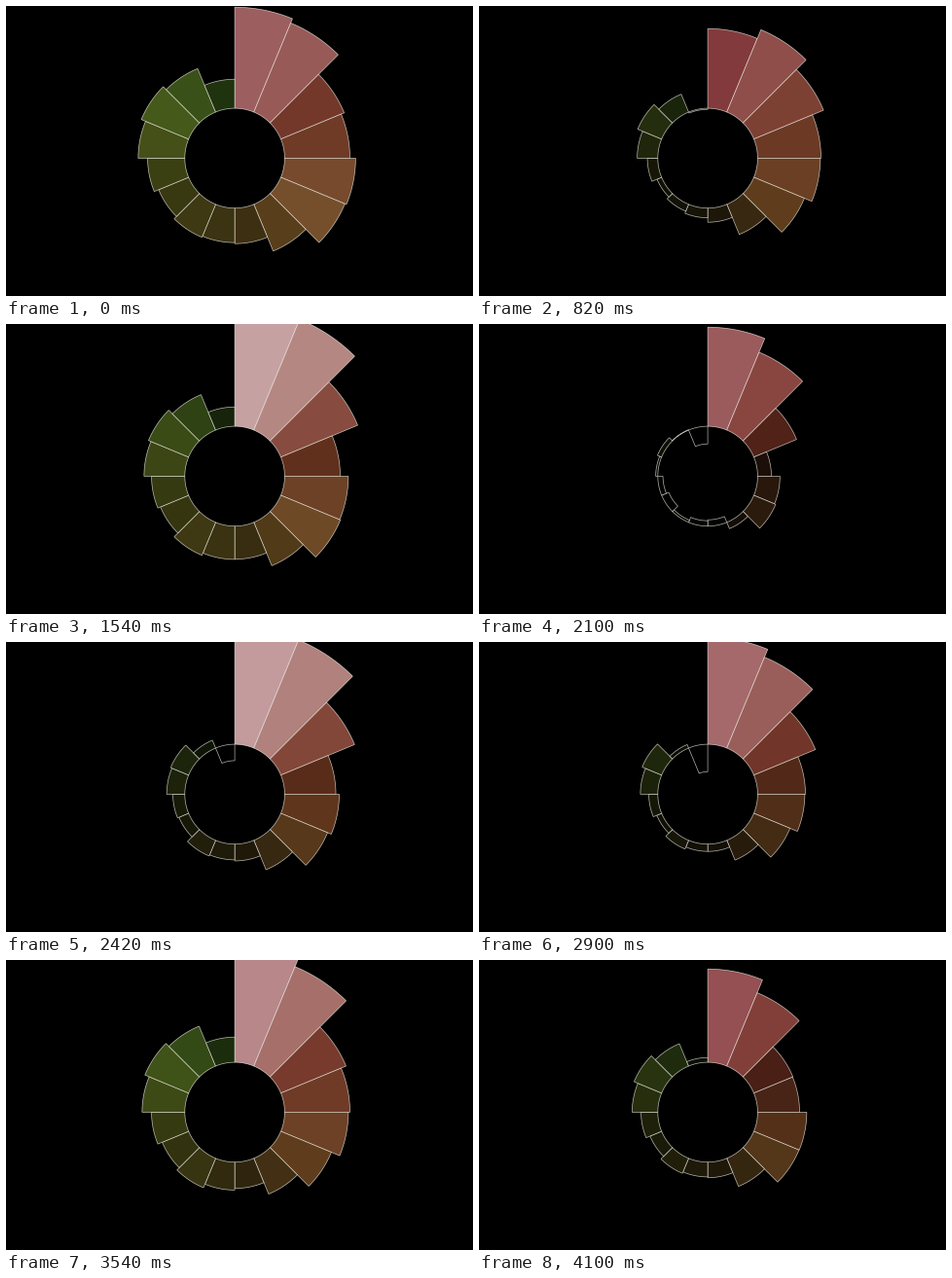
A matplotlib script that plays this animation: 480x298 px, repeating every 4.2 s.

```python
import colorsys

import matplotlib.pyplot as plt
import numpy as np
from matplotlib.animation import FuncAnimation
from matplotlib.patches import Polygon

W, H, DPI = 480, 298, 64
LOOP, TICK = 4200, 20          # ms
FIRST, STEP, LAST = 180, 80, 50
CX, CY, RING = 235.1, 156.4, 51.3
BARS = 16
idx = np.arange(BARS)

# Average spectrum: humps as (centre bar, height, spread)
BASE = 62
HUMPS = [(0.3, 98, 4.4), (4.5, 44, 3.4), (8.7, 9, 1.2), (12.9, 22, 4), (15.5, -18, 0.8)]

# Key poses: step, then the rise over the average at these bars
BANDS = [0, 2, 3, 5, 9, 13, 15]
POSES = {
    0: (-3, 2, 15, 19, 17, 20, 25),
    9: (-25, 9, 13, 4, -12, -6, -6),
    18: (30, 17, 5, 14, 17, 12, 15),
    25: (-5, -21, -38, -28, -22, -28, -23),
    35: (3, 0, -3, -12, -10, -11, -33),
    43: (18, 4, 15, 4, 13, 16, 21),
    49: (-11, -25, -9, -2, -3, -2, 0),
}

# Drum hits: step, lift at the first bar, change of lift per bar
HITS = [(15, 49, 1.5), (21, 50, -4), (28, 44, -2.4), (40, 27, 1.2)]
HIT_WIDTH = 3


def make_radii():
    """Outer radius of every bar at every step."""
    average = BASE + sum(h * np.exp(-(idx - c) ** 2 / s) for c, h, s in HUMPS)
    poses = np.array([np.interp(idx, BANDS, p) for p in POSES.values()])
    steps = np.arange(LAST + 1)
    radii = average + np.array([np.interp(steps, list(POSES), col) for col in poses.T]).T
    for step, lift, slope in HITS:
        swell = np.clip(1 - abs(steps - step) / HIT_WIDTH, 0, 1)
        radii += np.outer(swell, lift + slope * idx)
    return radii


def bar_color(i, value):
    hue = (6.25 * i - 2) / 360 % 1
    light = np.clip(0.025 + 0.0031 * value + 1.36e-5 * value ** 2, 0, 0.9)
    sat = np.clip(0.54 - 0.0064 * (value - 58), 0.25, 0.54)
    return colorsys.hls_to_rgb(hue, light, sat)


def bar_points(i, radius):
    a = np.radians(360 / BARS) * (i + np.linspace(0, 1, 24))
    arc = np.column_stack([np.sin(a), -np.cos(a)])
    return np.vstack([RING * arc, radius * arc[::-1]]) + (CX, CY)


radii = make_radii()

fig = plt.figure(figsize=(W / DPI, H / DPI), dpi=DPI, facecolor="black")
ax = fig.add_axes([0, 0, 1, 1])
ax.set_xlim(0, W)
ax.set_ylim(H, 0)
ax.axis("off")

bars = []
for i in idx:
    bar = Polygon(bar_points(i, radii[0, i]), closed=True, lw=0.7 * 72 / DPI,
                  edgecolor=(1, 1, 0.96, 0.7), joinstyle="miter", zorder=i + 1)
    bars.append(ax.add_patch(bar))


def update(frame):
    t = frame * TICK
    step = 0 if t < FIRST else min(LAST, 1 + (t - FIRST) // STEP)
    for i, bar in enumerate(bars):
        radius = radii[step, i]
        bar.set_xy(bar_points(i, radius))
        bar.set_facecolor(bar_color(i, radius - RING))
    return bars


anim = FuncAnimation(fig, update, frames=LOOP // TICK, interval=TICK,
                     repeat=True, repeat_delay=0)
plt.show()
```
